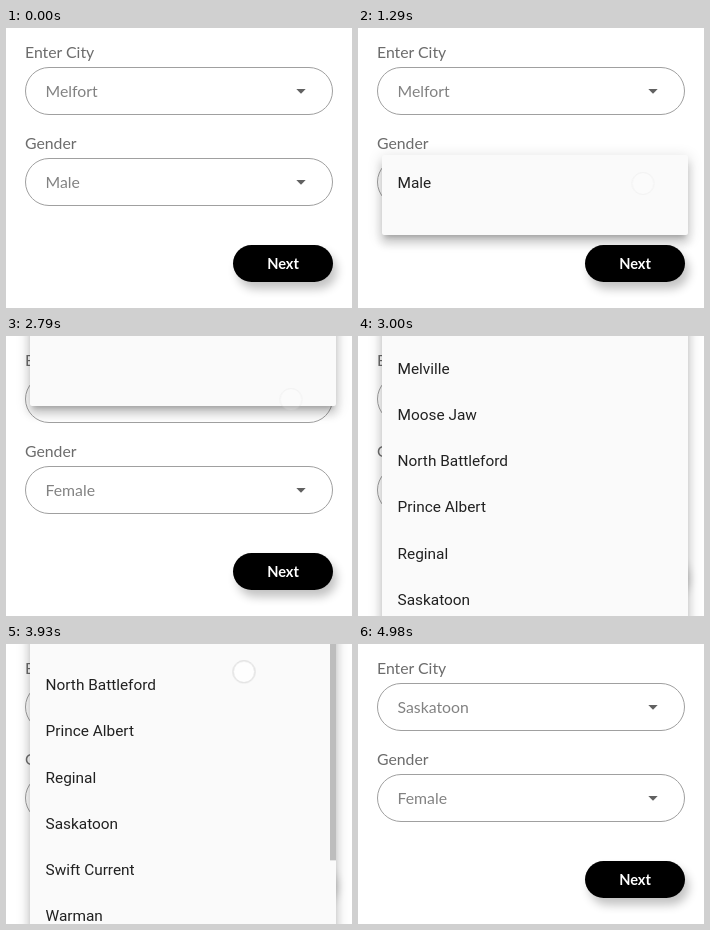
An HTML page for the animation above (6000 ms loop, 346 by 280 pixels).

```html
<!DOCTYPE html>
<html lang="en">
<head>
<meta charset="utf-8">
<title>City and gender form</title>
<style>
  html, body { margin: 0; width: 100%; height: 100%; overflow: hidden; background: #fff; }
  body { position: relative; font: 15.8px Lato, sans-serif; color: #6c6c6c; }
  div, svg { position: absolute; box-sizing: border-box; }
  .stage { left: 0; top: 0; width: 346px; height: 280px; overflow: hidden; }
  .stage * { animation: 6s linear infinite; }

  .label { left: 19px; line-height: 24px; white-space: nowrap; }
  .field {
    left: 19px; width: 308px; height: 48px;
    border: 1px solid #a0a0a0; border-radius: 24px; color: #828282;
  }
  .value { left: 19.5px; top: 0; width: 200px; height: 46px; line-height: 46px; overflow: hidden; }
  .value span { display: block; height: 46px; animation-timing-function: step-end; }
  .city .value span { animation-name: pick-city; }
  .gender .value span { animation-name: pick-gender; }
  .field svg { left: 270px; top: 21px; }

  .next {
    left: 227px; top: 216.5px; width: 100px; height: 37.5px; border-radius: 19px;
    background: #000; color: #fff; font: bold 14.6px/37px Lato, sans-serif; text-align: center;
    box-shadow: 4px 7px 10px #0000003d;
  }

  .menu { left: 24px; top: 0; width: 306px; height: 280px; opacity: 0; color: #212121; font: 15.4px Roboto, sans-serif; }
  .sheet {
    left: 0; width: 306px; border-radius: 2px; background: #fafafa;
    box-shadow: 0 5px 5px -3px #0003, 0 8px 10px 1px #00000024, 0 3px 14px 2px #0000001f;
  }
  .list { left: 15.5px; --k: 1; }
  .list p { margin: 0; height: 46.2px; line-height: 46.2px; white-space: nowrap; }

  #genders { animation-name: gender-menu; }
  #genders .sheet { animation-name: gender-sheet; }
  #genders .list { top: 131.8px; }
  #genders p + p { animation-name: female-in; }

  #cities { animation-name: city-menu; }
  #cities .sheet { animation-name: city-sheet; }
  #cities .list { top: -313.4px; animation-name: scroll; }
  #cities p { animation-name: item-in; animation-fill-mode: backwards; }
  .thumb { left: 300px; top: -322px; width: 6px; height: 474px; background: #bdbdbd; --k: -.77; animation-name: scroll, thumb-in; }

  .touch {
    left: -11.5px; top: -11.5px; width: 23px; height: 23px; border-radius: 50%;
    border: 1.5px solid #d0d0d0; background: #fffc; opacity: 0; animation-name: touch;
  }

  @keyframes pick-gender { 0% { translate: 0 0; } 32.45%, 100% { translate: 0 -46px; } }
  @keyframes pick-city { 0% { translate: 0 0; } 80.4%, 100% { translate: 0 -46px; } }

  @keyframes gender-menu {
    0%, 19.5% { opacity: 0; }
    20.75%, 32.4% { opacity: 1; }
    34.4%, 100% { opacity: 0; }
  }
  @keyframes gender-sheet {
    0%, 20.78% { top: 131.2px; height: 46.2px; }
    22.13%, 100% { top: 123.5px; height: 107.5px; }
  }
  @keyframes female-in { 0%, 23.43% { opacity: 0; } 24.5%, 100% { opacity: 1; } }

  @keyframes city-menu {
    0%, 45% { opacity: 0; }
    46.25%, 80.3% { opacity: 1; }
    81.7%, 100% { opacity: 0; }
  }
  @keyframes city-sheet {
    0%, 46.25% { top: -37px; height: 46.2px; }
    47.5%, 100% { top: -322px; height: 616px; }
  }
  @keyframes item-in {
    0% { opacity: 0; }
    .2%, 50% { opacity: 1; }
    50.01%, 100% { opacity: 0; }
  }
  @keyframes scroll {
    0% { translate: 0 0; }
    60% { translate: 0 0; animation-timing-function: cubic-bezier(.33, 0, .67, .33); }
    65.5% { translate: 0 calc(-83px * var(--k)); }
    68.5%, 100% { translate: 0 calc(-184.8px * var(--k)); }
  }
  @keyframes thumb-in { 0%, 60% { opacity: 0; } 62%, 100% { opacity: 1; } }

  @keyframes touch {
    0%, 17.8% { translate: 284.5px 155px; opacity: 0; }
    18.3%, 20.5% { translate: 284.5px 155px; opacity: 1; }
    21.8% { translate: 284.5px 155px; opacity: 0; }

    38.3% { translate: 238.5px 197.5px; opacity: 0; }
    38.8%, 39.4% { translate: 238.5px 197.5px; opacity: 1; }
    40.4% { translate: 238.5px 197.5px; opacity: 0; }

    43.3% { translate: 284.5px 63px; opacity: 0; }
    43.8%, 45.5% { translate: 284.5px 63px; opacity: 1; }
    46.8% { translate: 284.5px 63px; opacity: 0; }

    59.3% { translate: 237.5px 127px; opacity: 0; }
    59.8% { translate: 237.5px 127px; opacity: 1; animation-timing-function: cubic-bezier(.33, 0, .67, .33); }
    65.5% { translate: 237.5px 27.5px; opacity: 1; }
    66.7% { translate: 237.5px 10px; opacity: 0; }

    77.95% { translate: 213.5px 88.5px; opacity: 0; }
    78%, 81% { translate: 213.5px 88.5px; opacity: 1; }
    82.8%, 100% { translate: 213.5px 88.5px; opacity: 0; }
  }
</style>
</head>
<body>
<div class="stage">
  <div class="label" style="top:12px">Enter City</div>
  <div class="field city" style="top:39px">
    <div class="value"><span>Melfort</span><span>Saskatoon</span></div>
    <svg width="10" height="5"><path d="M.3 0h9.4L5 4.7z" fill="#616161"/></svg>
  </div>

  <div class="label" style="top:103.4px">Gender</div>
  <div class="field gender" style="top:130px">
    <div class="value"><span>Male</span><span>Female</span></div>
    <svg width="10" height="5"><path d="M.3 0h9.4L5 4.7z" fill="#616161"/></svg>
  </div>

  <div class="next">Next</div>

  <div class="menu" id="genders">
    <div class="sheet"></div>
    <div class="list"><p>Male</p><p>Female</p></div>
  </div>

  <div class="menu" id="cities">
    <div class="sheet"></div>
    <div class="list"></div>
    <div class="thumb"></div>
  </div>

  <div class="touch"></div>
</div>
<script>
  const names = ['Estevan', 'Flin Flon', 'Humboldt', 'Lloydminster', 'Martensville', 'Meadow Lake',
    'Melfort', 'Melville', 'Moose Jaw', 'North Battleford', 'Prince Albert', 'Reginal',
    'Saskatoon', 'Swift Current', 'Warman', 'Weyburn', 'Yorkton'];
  const list = document.querySelector('#cities .list');

  // Items appear one after another in the second half of the 300 ms opening.
  names.forEach((name, i) => {
    const item = document.createElement('p');
    item.textContent = name;
    const part = 0.5 + 0.5 * (i + 1) / (names.length + 1.5);
    item.style.animationDelay = 2700 + 300 * part + 'ms';
    list.append(item);
  });
</script>
</body>
</html>
```
